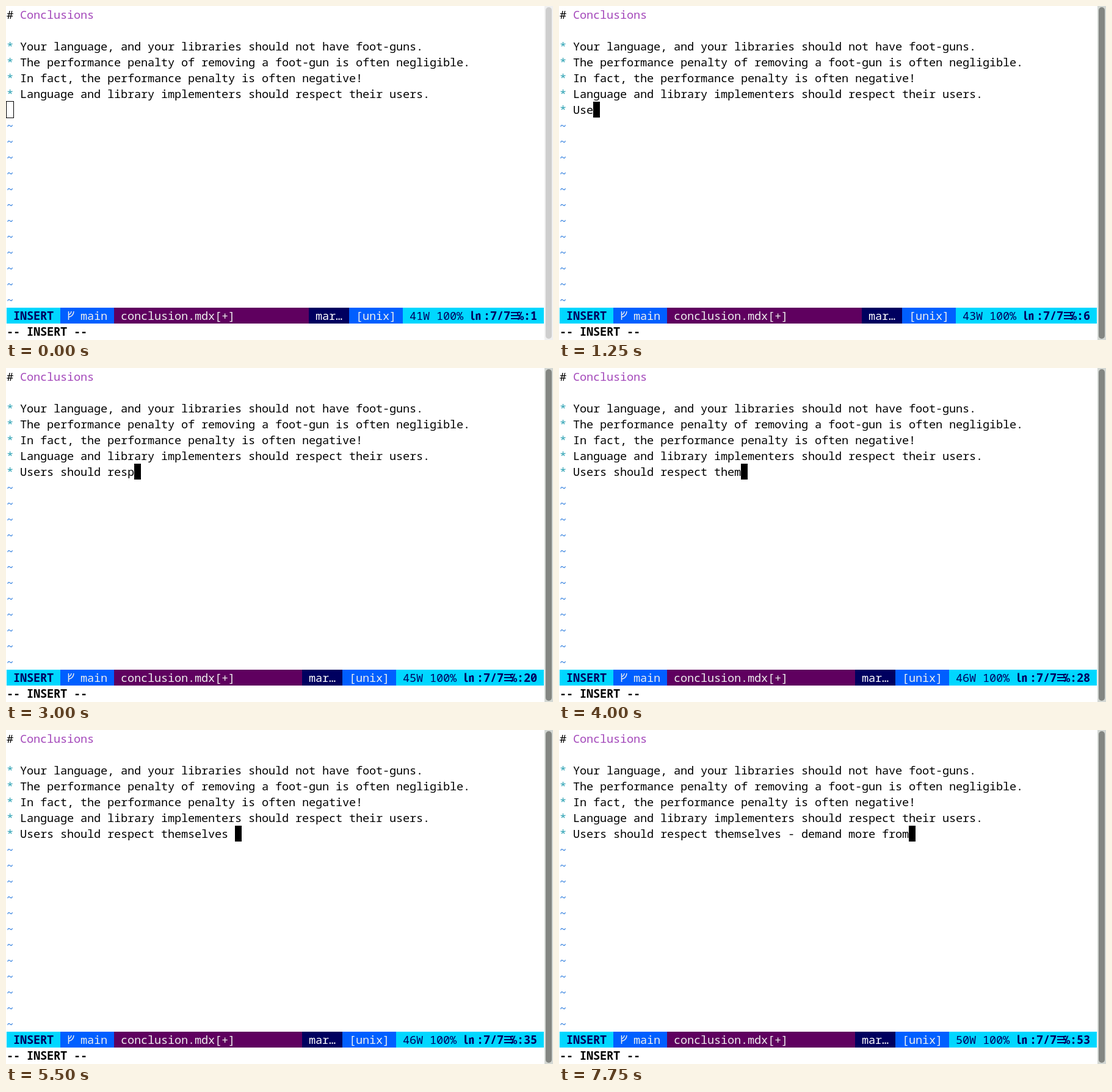
An HTML page with a canvas for the animation above (8 s loop, 896x548 px).

```html
<!DOCTYPE html>
<html lang="en">
<head>
<meta charset="utf-8">
<title>Conclusions</title>
<style>
html, body { margin: 0; width: 100%; height: 100%; overflow: hidden; background: #fff; }
canvas { display: block; }
</style>
</head>
<body>
<canvas id="stage" width="896" height="548"></canvas>
<script>
const ctx = document.getElementById('stage').getContext('2d');
const LOOP = 8000, STEP = 250;
const CELL_W = 11, CELL_H = 26, ORIGIN = 1, BASELINE = 20;
const COLS = 80, STATUS_ROW = 19, TYPED_ROW = 6;
const FONT = '18.67px "Noto Sans Mono", monospace';
const CYAN = '#00d7ff', NAVY = '#00005f', BLUE = '#005fff', PALE = '#eeeeee';

const bullets = [
  'Your language, and your libraries should not have foot-guns.',
  'The performance penalty of removing a foot-gun is often negligible.',
  'In fact, the performance penalty is often negative!',
  'Language and library implementers should respect their users.'
];
const sentence = '* Users should respect themselves - demand more from ';
// [time in ms, characters typed]
const typing = [[500, 0], [2000, 11], [4000, 27], [5500, 34], [6500, 43], [7750, 52]];

const cellX = col => ORIGIN + col * CELL_W;
const cellY = row => ORIGIN + row * CELL_H;
const countWords = text => text.split(/\s+/).filter(Boolean).length;
const baseWords = countWords('# Conclusions ' + bullets.map(b => '* ' + b).join(' '));

function box(x, y, w, h, color) {
  ctx.fillStyle = color;
  ctx.fillRect(x, y, w, h);
}

function write(text, col, row, color, bold = false) {
  ctx.font = (bold ? 'bold ' : '') + FONT;
  ctx.fillStyle = color;
  [...text].forEach((ch, i) => {
    if (ch !== ' ') ctx.fillText(ch, cellX(col + i), cellY(row) + BASELINE);
  });
}

function segment(text, col, width, back, color, bold) {
  box(cellX(col), cellY(STATUS_ROW), width * CELL_W, CELL_H, back);
  write(text, col + 1, STATUS_ROW, color, bold);
}

function typedCount(t) {
  if (t <= typing[0][0]) return 0;
  for (let i = 1; i < typing.length; i++) {
    const [t0, n0] = typing[i - 1], [t1, n1] = typing[i];
    if (t <= t1) return Math.floor(n0 + (n1 - n0) * (t - t0) / (t1 - t0));
  }
  return typing[typing.length - 1][1];
}

function drawBranch(x, y) {
  ctx.strokeStyle = PALE;
  ctx.lineWidth = 1.5;
  ctx.beginPath();
  ctx.moveTo(x + 2.5, y + 6);
  ctx.lineTo(x + 2.5, y + 20);
  ctx.moveTo(x + 2.5, y + 11.5);
  ctx.quadraticCurveTo(x + 6.5, y + 10.5, x + 7, y + 6);
  ctx.moveTo(x + 2.5, y + 15.5);
  ctx.quadraticCurveTo(x + 10.5, y + 14, x + 11, y + 6);
  ctx.stroke();
}

function drawStatus(typed) {
  const column = String(typed.length + 1);
  const right = COLS - 20 - column.length;
  const words = baseWords + countWords(typed);
  segment('INSERT', 0, 8, CYAN, NAVY, true);
  segment('  main', 8, 8, BLUE, PALE);
  drawBranch(cellX(9), cellY(STATUS_ROW));
  segment('conclusion.mdx[+]', 16, right - 30, '#5f005f', PALE);
  segment('mar…', right - 14, 6, NAVY, '#fff');
  segment('[unix]', right - 8, 8, BLUE, PALE);
  segment(words + 'W 100%', right, COLS - right, CYAN, NAVY);

  ctx.font = 'bold 18.67px "Noto Sans CJK JP", "Noto Sans CJK", sans-serif';
  ctx.fillText('㏑', cellX(right + 10), cellY(STATUS_ROW) + BASELINE);
  write(':7/7', right + 12, STATUS_ROW, NAVY, true);
  const barX = cellX(right + 16) + 1;
  for (const y of [7, 12, 17]) box(barX, cellY(STATUS_ROW) + y, 15, 2, NAVY);
  write('℅:' + column, right + 17, STATUS_ROW, NAVY, true);
}

function drawScrollbar(focused) {
  box(882, 0, 14, 548, focused ? '#d3d7d3' : '#f0f0f0');
  ctx.fillStyle = focused ? '#838682' : '#cecece';
  ctx.beginPath();
  ctx.roundRect(884, 2, 10, 544, 5);
  ctx.fill();
}

function drawCursor(col, focused) {
  const x = cellX(col), y = cellY(TYPED_ROW);
  if (focused) {
    box(x, y, CELL_W, CELL_H, '#000');
  } else {
    ctx.strokeStyle = '#000';
    ctx.lineWidth = 1;
    ctx.strokeRect(x - 0.5, y - 0.5, CELL_W + 1, CELL_H + 1);
  }
}

function draw(t) {
  const focused = t >= STEP;
  const typed = sentence.slice(0, typedCount(t));
  box(0, 0, 896, 548, '#fff');

  write('#', 0, 0, '#000');
  write('Conclusions', 2, 0, '#a347ba');
  [...bullets, typed.slice(2)].forEach((text, i) => {
    if (i < bullets.length || typed) write('*', 0, i + 2, '#2aa1b3');
    write(text, 2, i + 2, '#000');
  });
  for (let row = TYPED_ROW + 1; row < STATUS_ROW; row++) write('~', 0, row, '#2a7bde');

  drawCursor(typed.length, focused);
  drawStatus(typed);
  write('-- INSERT --', 0, STATUS_ROW + 1, '#000', true);
  drawScrollbar(focused);
}

const start = performance.now();
function tick() {
  const t = (performance.now() - start) % LOOP;
  draw(Math.floor(t / STEP) * STEP);
  requestAnimationFrame(tick);
}
tick();
</script>
</body>
</html>
```
